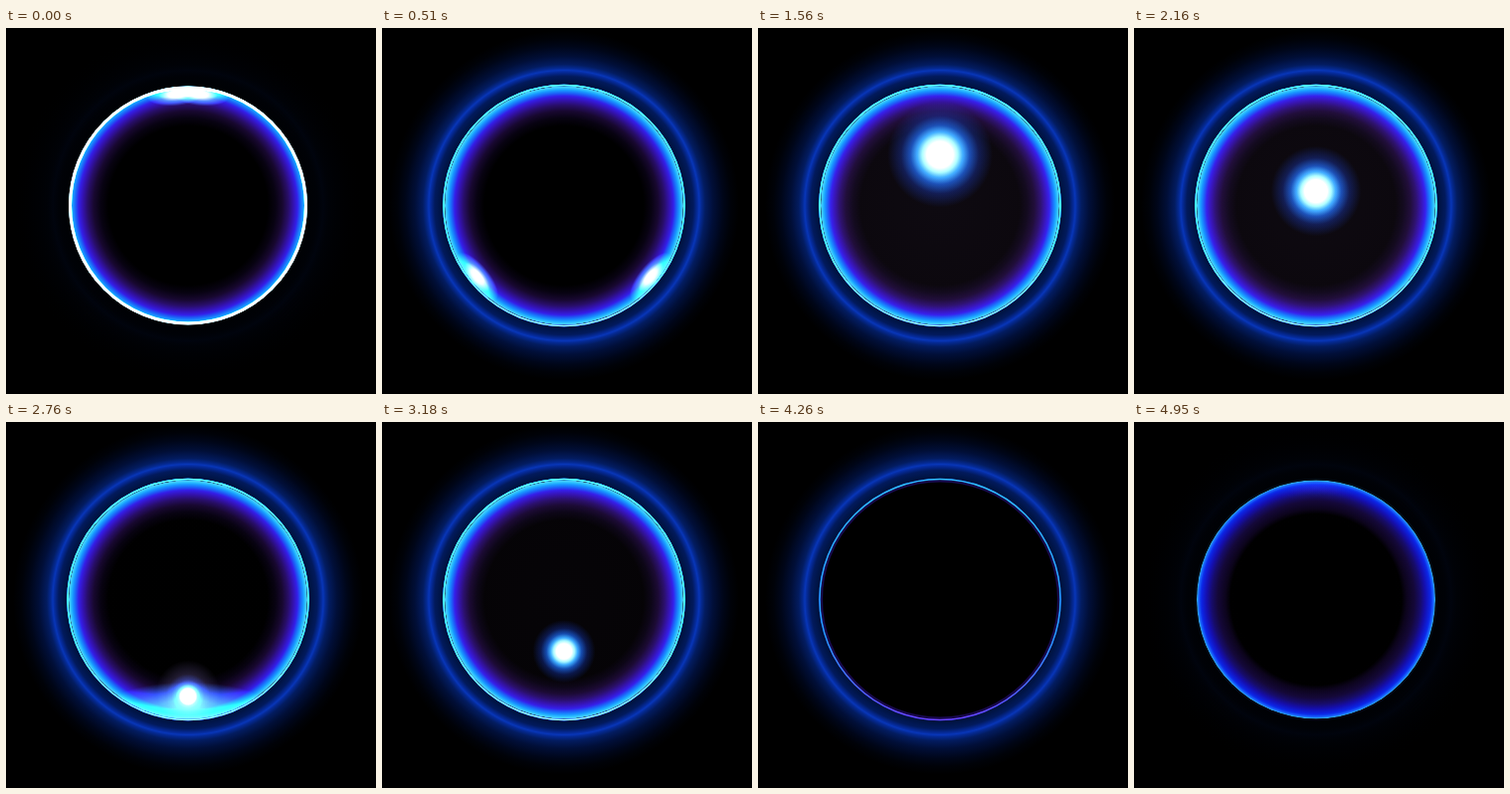
An HTML page with a canvas for the animation above (4980 ms loop, 372 by 368 pixels).

```html
<!DOCTYPE html>
<html lang="en">
<head>
<meta charset="utf-8">
<title>Glowing ring</title>
<style>
html, body { margin: 0; width: 100%; height: 100%; overflow: hidden; background: #000; }
canvas { display: block; }
</style>
</head>
<body>
<canvas id="stage" width="372" height="368"></canvas>
<script>
const ctx = document.getElementById('stage').getContext('2d');
const LOOP = 4980, CX = 183, CY = 178.5, TAU = Math.PI * 2;
const MEET = 720, SWING = 2090;

// Radius and colour pairs; layers are added as light.
const HALO = [[118, '#001038'], [124, '#001444'], [130, '#021a5c'], [134, '#052a98'],
  [136, '#0836b8'], [138, '#052a94'], [142, '#031c60'], [150, '#010f38'],
  [160, '#000619'], [168, '#000208'], [176, '#000']];
const HOT = [[80, '#000'], [88, '#080312'], [95, '#180830'], [101, '#280e68'],
  [106, '#3412b0'], [110, '#341ee8'], [113, '#1c60f8'], [116, '#189cff'], [118, '#30c4ff'], [120, '#58d0f8']];
const COOL = [[86, '#000'], [91, '#0c041c'], [99, '#140838'], [105, '#160c68'],
  [110, '#140eac'], [115, '#0c20e4'], [118, '#0c54f8'], [119.2, '#1890ff'], [120, '#30b8f0']];
const BALL = [[0, '#fff'], [.24, '#fff'], [.34, '#a0f4ff'], [.43, '#38a8f8'],
  [.56, '#1048a8'], [.74, '#061444'], [1, '#000']];
const SPARK = [[0, '#fff'], [.3, '#d8f8ff'], [.6, '#2078a8'], [1, '#000']];
const POOL = [[0, '#30c8ff'], [.4, '#20a0f0'], [.7, '#0c4498'], [1, '#000']];
const HAZE = [[0, '#0e0a11'], [.75, '#0c080e'], [1, '#000']];
const MIST = [[0, '#6858a0'], [.4, '#302848'], [1, '#000']];

// Linear interpolation through [time, value] points.
function track(t, points) {
  for (let i = 1; i < points.length; i++) {
    const [a, u] = points[i - 1], [b, v] = points[i];
    if (t <= b) return u + (v - u) * (t - a) / (b - a);
  }
  return points.at(-1)[1];
}

function gradient(stops, size) {
  const g = ctx.createRadialGradient(0, 0, 0, 0, 0, size);
  for (const [r, colour] of stops) g.addColorStop(r / size, colour);
  return g;
}

function ring(stops, alpha, inner = 0) {
  const size = stops.at(-1)[0];
  ctx.globalAlpha = alpha;
  ctx.fillStyle = gradient(stops, size);
  ctx.beginPath();
  ctx.arc(0, 0, size, 0, TAU);
  if (inner) ctx.arc(0, 0, inner, 0, TAU, true);
  ctx.fill();
}

function glow(stops, x, y, rx, ry, alpha, turn = 0) {
  ctx.save();
  ctx.globalAlpha = alpha;
  ctx.translate(x, y);
  ctx.rotate(turn);
  ctx.scale(rx, ry);
  ctx.fillStyle = gradient(stops, 1);
  ctx.fillRect(-1, -1, 2, 2);
  ctx.restore();
}

function line(radius, width, style, alpha) {
  ctx.globalAlpha = alpha;
  ctx.lineWidth = width;
  ctx.strokeStyle = style;
  ctx.beginPath();
  ctx.arc(0, 0, radius, 0, TAU);
  ctx.stroke();
}

function draw(t) {
  const halo = track(t, [[0, .07], [450, 1], [4350, 1], [4900, .07], [LOOP, .07]]);
  const hot = track(t, [[0, 1], [3850, 1], [4200, 0], [4950, 0], [LOOP, 1]]);
  const cool = track(t, [[0, 0], [4350, 0], [4900, 1], [4950, 1], [LOOP, 0]]);
  const flash = track(t, [[0, 1], [300, 0], [4950, 0], [LOOP, 1]]);
  const ball = track(t, [[0, 0], [MEET - 40, 0], [MEET + 40, 1], [3780, 1], [4080, 0]]);
  const height = (1 - Math.cos((t - MEET) / SWING * TAU)) / 2;
  const low = Math.max(0, 1 - height * 5);

  ctx.setTransform(1, 0, 0, 1, 0, 0);
  ctx.globalAlpha = 1;
  ctx.globalCompositeOperation = 'source-over';
  ctx.fillStyle = '#000';
  ctx.fillRect(0, 0, 372, 368);
  ctx.translate(CX, CY);
  ctx.globalCompositeOperation = 'lighter';

  ring(HALO, halo, 120.5);

  ctx.save();
  ctx.beginPath();
  ctx.arc(0, 0, 120, 0, TAU);
  ctx.clip();
  ring(HOT, hot);
  ring(COOL, cool);
  if (ball > 0) {
    const y = 98 - 164 * height, size = 22 + 34 * height;
    glow(HAZE, 0, 0, 118, 118, ball * Math.min(1, height * 1.6));
    glow(POOL, 0, 113, 88, 30, ball * low);
    glow(MIST, 0, y - 4, 32, 32, ball * low);
    glow(BALL, 0, y, size, size, ball);
  }
  const spark = track(t, [[0, 1], [MEET, 1], [MEET + 120, 0], [4950, 0], [LOOP, 1]]);
  if (spark > 0) {
    const angle = t > 4900 ? .1 : Math.min(Math.PI, .1 + t / MEET * (Math.PI - .1));
    for (const side of [-1, 1]) {
      const a = angle * side;
      glow(SPARK, 113 * Math.sin(a), -113 * Math.cos(a), 30, 12, spark, a);
    }
  }
  ctx.restore();

  line(118.5, 3, '#fff', flash);
  const rim = ctx.createLinearGradient(0, -121, 0, 121);
  rim.addColorStop(0, '#30b0ff');
  rim.addColorStop(.65, '#2890ff');
  rim.addColorStop(1, '#6a34e8');
  const edge = halo * (1 - flash);
  line(121, 1.5, rim, edge);
  line(121, 1.5, '#30c8f0', edge * hot);
  line(119, 2, '#30109a', edge * (1 - hot) * .5);
}

function frame(now) {
  draw(now % LOOP);
  requestAnimationFrame(frame);
}
requestAnimationFrame(frame);
</script>
</body>
</html>
```
